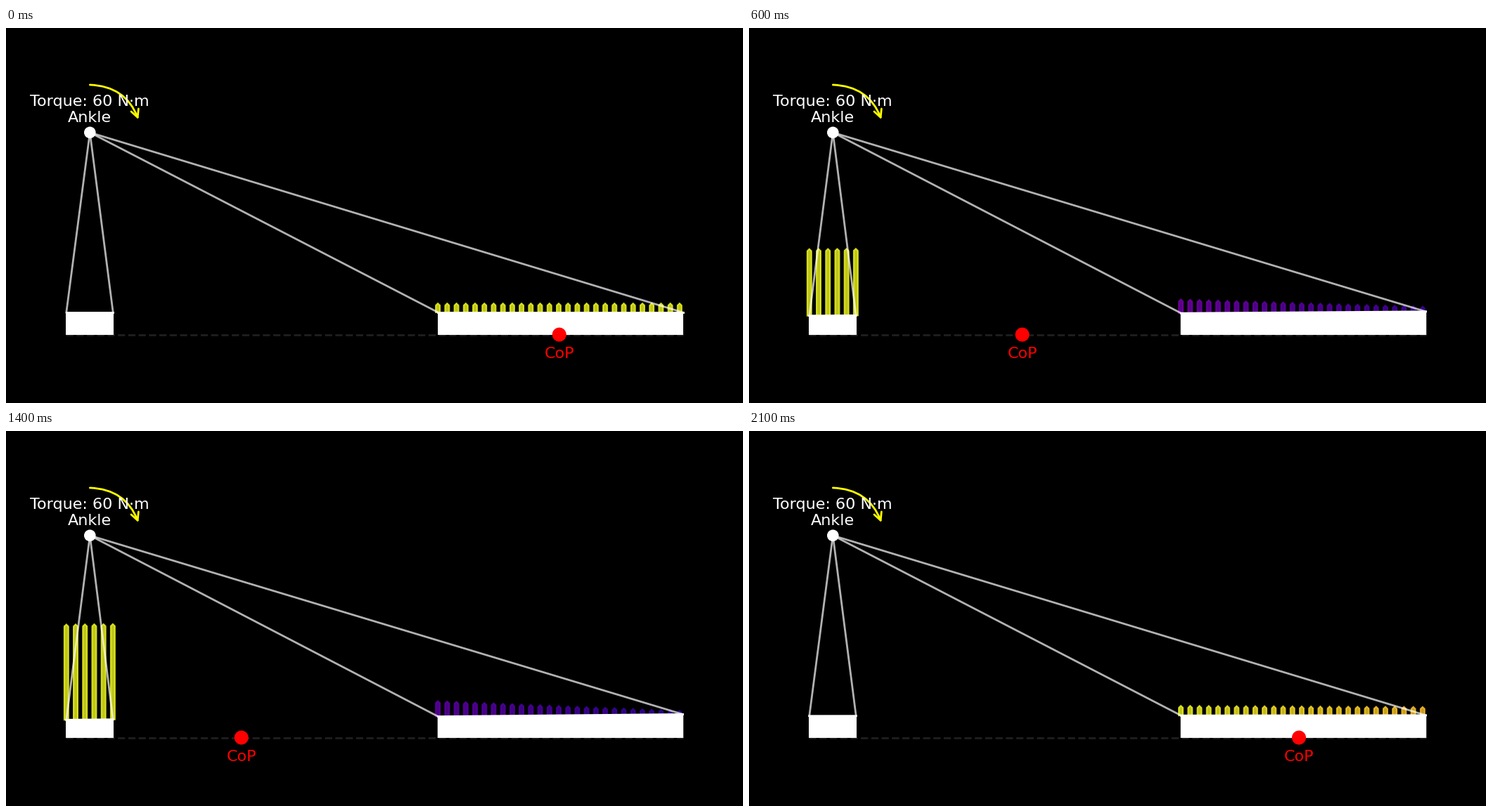
A matplotlib script for the animation above (2.2 s loop, 1048 px wide and 534 px high).

```python
import numpy as np
import matplotlib.pyplot as plt
from matplotlib.animation import FuncAnimation
from matplotlib.collections import PolyCollection
from matplotlib.patches import Circle, FancyArrowPatch, Polygon

W, H, DPI = 1048, 534, 200
PT = 72 / DPI                      # one pixel in points
FRAMES, STEP_MS = 22, 100

ANKLE = (119.3, 148.8)
GROUND, REST = 436.6, 405.0
PIVOT = 785.7                      # the plate turns about the forefoot's middle
PITCH = 13.22
HEEL_X = 85.8 + PITCH * np.arange(6)
FORE_X = 614.1 + PITCH * np.arange(27)
SENSORS = np.concatenate([HEEL_X, FORE_X])
PADS = [(85.0, 153.0), (613.7, 963.2)]
PX_PER_N = 2.5
plasma = plt.colormaps["plasma"]

fig = plt.figure(figsize=(W / DPI, H / DPI), dpi=DPI, facecolor="black")
ax = fig.add_axes([0, 0, 1, 1])
ax.set_xlim(0, W)
ax.set_ylim(H, 0)
ax.axis("off")


def plate_y(x, k):
    return REST + 0.00113 * k * (PIVOT - x)


def forces(k):
    """Newtons on each heel and forefoot sensor at load step k."""
    fore_total = 161 + k
    heel = max(0.0, 100 + 50 * k - fore_total) / len(HEEL_X)
    tilt = np.linspace(1, -1, len(FORE_X)) * 0.42 * k
    fore = fore_total / len(FORE_X) + tilt
    return np.concatenate([np.full(len(HEEL_X), heel), fore])


def bar(x, base, length):
    tip = base - max(length, 1.0)
    neck = min(tip + 3.2, base)
    return [(x - 3.0, base), (x - 3.0, neck), (x - 3.3, neck), (x, tip),
            (x + 3.3, neck), (x + 3.0, neck), (x + 3.0, base)]


def cop_x(k):
    return ANKLE[0] + min(2154 / (k + 2), 667.4 - 4.7 * k)


# static parts
ax.plot([85.2, 963], [GROUND, GROUND], "--", color="#1f1f1f", lw=1, zorder=1)
ax.add_patch(FancyArrowPatch(
    (119.3, 80.9), (188.3, 130.2), arrowstyle="->", mutation_scale=10,
    connectionstyle="arc3,rad=-0.33", shrinkA=0, shrinkB=0,
    color="yellow", lw=1, zorder=2))
ax.add_patch(Circle(ANKLE, 8.3, color="white", lw=0, zorder=6))
label = dict(fontsize=8, family="DejaVu Sans", ha="center", va="baseline", zorder=7)
ax.text(ANKLE[0], 110.6, "Torque: 60 N·m", color="white", **label)
ax.text(ANKLE[0], 134.4, "Ankle", color="white", **label)

# moving parts
bars = PolyCollection([], linewidths=2 * PT, joinstyle="miter", zorder=3)
ax.add_collection(bars, autolim=False)
blocks = [ax.add_patch(Polygon([(0, 0)] * 4, fc="white", lw=0, zorder=4)) for _ in PADS]
edges = [ax.plot([], [], color="white", lw=1, solid_capstyle="projecting", zorder=4)[0]
         for _ in PADS]
legs = [ax.plot([], [], color="white", alpha=0.7, lw=1, zorder=5)[0] for _ in range(4)]
dot = ax.add_patch(Circle((0, GROUND), 10, color="red", lw=0, zorder=8))
cop_label = ax.text(0, 470.4, "CoP", color="red", **label)


def update(i):
    k = min(i, FRAMES - i)

    load = forces(k)
    on = load > 0
    verts = [bar(x, plate_y(x, k), f * PX_PER_N - 2)
             for x, f in zip(SENSORS[on], load[on])]
    colors = plasma(load[on] / load.max())
    colors[:, 3] = 0.8
    bars.set_verts(verts)
    bars.set_facecolor(colors)
    bars.set_edgecolor(colors)

    for n, (a, b) in enumerate(PADS):
        ya, yb = plate_y(a, k), plate_y(b, k)
        blocks[n].set_xy([(a, ya), (b, yb), (b, 437), (a, 437)])
        edges[n].set_data([a + 0.7, b - 0.7], [ya, yb])
        for leg, x, y in ((legs[2 * n], a + 0.8, ya), (legs[2 * n + 1], b - 0.8, yb)):
            leg.set_data([ANKLE[0], x], [ANKLE[1], y])

    x = cop_x(k)
    dot.center = (x, GROUND)
    cop_label.set_x(x)
    return [bars, *blocks, *edges, *legs, dot, cop_label]


anim = FuncAnimation(fig, update, frames=FRAMES, init_func=lambda: update(0),
                     interval=STEP_MS, repeat=True, repeat_delay=0, blit=False)
plt.show()
```
